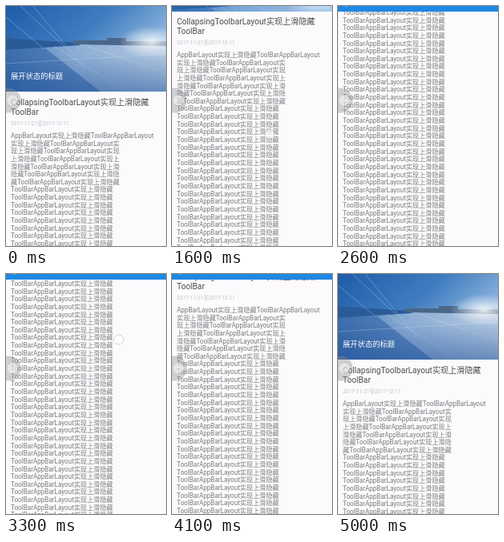
An HTML page for the animation above (5100 ms loop, 200 by 300 pixels).

```html
<!DOCTYPE html>
<html lang="zh">
<head>
<meta charset="utf-8">
<style>
html, body { margin: 0; width: 100%; height: 100%; overflow: hidden; background: #fcfafd; }
svg { display: block; width: 200px; height: 300px; }
text { font-family: Roboto, "Noto Sans CJK SC", "Noto Sans CJK", sans-serif; }
.head { font-size: 10.15px; fill: #4c4c4e; }
.date { font-size: 6.55px; fill: #c3c1c5; }
.body { font-size: 8.13px; fill: #7b7a7d; }
.name { font-size: 9.3px; fill: #fff; }
</style>
</head>
<body>
<svg viewBox="0 0 200 300">
  <defs>
    <linearGradient id="sky" x1="0" y1="0" x2="1" y2=".6">
      <stop offset="0" stop-color="#1f5ca8"/>
      <stop offset=".5" stop-color="#3f7cc0"/>
      <stop offset="1" stop-color="#a5c6e5"/>
    </linearGradient>
    <linearGradient id="ground" x1="0" y1="0" x2="1" y2="0">
      <stop offset="0" stop-color="#4d7bb8"/>
      <stop offset=".45" stop-color="#8eaed5"/>
      <stop offset="1" stop-color="#b3c8e1"/>
    </linearGradient>
    <linearGradient id="shade" x1="0" y1="0" x2="0" y2="1">
      <stop offset="0" stop-color="#1d4f95" stop-opacity="0"/>
      <stop offset="1" stop-color="#1d4f95" stop-opacity=".5"/>
    </linearGradient>
    <radialGradient id="glow">
      <stop offset="0" stop-color="#fff" stop-opacity=".85"/>
      <stop offset="1" stop-color="#fff" stop-opacity="0"/>
    </radialGradient>
    <clipPath id="clip"><rect id="view" width="200" height="107"/></clipPath>
  </defs>
  <rect width="200" height="300" fill="#fcfafd"/>
  <g id="page"></g>
  <g clip-path="url(#clip)">
    <g id="photo">
      <rect width="200" height="107" fill="url(#sky)"/>
      <path d="M0 52L90 47L200 49V107H0Z" fill="url(#ground)"/>
      <path d="M0 40L40 43L92 46V49L0 55Z" fill="#2b5a98"/>
      <path d="M84 43H126V40H150V44H200V50L84 48Z" fill="#4a6689"/>
      <ellipse cx="182" cy="45" rx="42" ry="20" fill="url(#glow)"/>
      <path d="M0 55L48 52L118 107H0Z" fill="#2e61a6" opacity=".55"/>
      <path d="M18 0L74 52M34 0L98 78M0 14L48 54M0 72L200 60M96 48L200 84M60 50L150 107"
        fill="none" stroke="#d4e5f5" stroke-width=".7" opacity=".45"/>
      <rect y="60" width="200" height="47" fill="url(#shade)"/>
    </g>
    <rect id="scrim" width="200" height="107" fill="#1e88e5"/>
    <path id="arrow" d="M9 0H12" stroke="#fff" stroke-width="1" opacity=".7"/>
    <text id="name" class="name" x="6" y="90.5">展开状态的标题</text>
  </g>
  <circle id="touch" r="6" fill="#fff" fill-opacity=".6" stroke="#c9c7cb" stroke-width=".8"/>
  <circle cx="3" cy="118" r="15.5" fill="#8c8c8e" fill-opacity=".4"/>
  <circle cx="8" cy="118" r="6.5" fill="#fff" fill-opacity=".5"/>
</svg>
<script>
const LOOP = 5100, STEP = 100, BAR = 7, FULL = 107, PITCH = 9.65;
const $ = id => document.getElementById(id);
const clamp = v => Math.max(0, Math.min(1, v));

function addText(cls, y, str) {
  const el = document.createElementNS("http://www.w3.org/2000/svg", "text");
  el.setAttribute("class", cls);
  el.setAttribute("x", 6);
  el.setAttribute("y", y);
  el.textContent = str;
  $("page").append(el);
}

const cjk = "实现上滑隐藏", word = "ToolBarAppBarLayout";
addText("head", 123.7, "CollapsingToolbarLayout" + cjk);
addText("head", 135.8, "ToolBar");
addText("date", 148.6, "2017-11-21至2017-12-11");
for (let i = 0; i < 42; i++) {
  const line = i === 0 ? "AppBarLayout" + cjk + word
    : i < 7 ? cjk.slice(i - 1) + word + cjk.slice(0, i)
    : word + cjk;
  addText("body", 164.9 + i * PITCH, line);
}

// Keys are [time, values...]
function along(keys, t) {
  if (t <= keys[0][0]) return keys[0].slice(1);
  for (let i = 1; i < keys.length; i++) {
    const a = keys[i - 1], b = keys[i];
    if (t <= b[0]) {
      const k = (t - a[0]) / (b[0] - a[0]);
      return a.slice(1).map((v, j) => v + (b[j + 1] - v) * k);
    }
  }
  return keys[keys.length - 1].slice(1);
}

const scroll = [[500, 0], [700, 3], [1000, 18], [1600, 101], [2300, 221], [2600, 240.8],
  [3000, 247], [3300, 236.8], [3500, 212], [4100, 117], [4700, 0]];
const drags = [
  [[600, 108, 268], [1000, 110, 250], [1600, 122, 160], [2300, 127, 42]],
  [[3100, 140, 74], [3300, 141, 82], [3500, 147, 106], [4000, 148, 186]],
  [[4200, 146, 152], [4700, 149, 252]]
];

function draw(t) {
  const [s] = along(scroll, t);
  $("page").setAttribute("transform", `translate(0 ${-s})`);
  $("view").setAttribute("height", Math.max(BAR, FULL - s));
  $("photo").setAttribute("transform", `translate(0 ${-Math.min(s, FULL - BAR) / 2})`);
  const scrim = clamp((t - 1500) / 600) - clamp((t - 4250) / 600);
  $("scrim").setAttribute("opacity", scrim);
  $("arrow").setAttribute("opacity", scrim * 0.7);
  $("name").setAttribute("opacity", s < 0.5 ? 1 : 0);

  const drag = drags.find(d => t >= d[0][0] && t <= d[d.length - 1][0]);
  $("touch").setAttribute("opacity", drag ? 1 : 0);
  if (drag) {
    const [x, y] = along(drag, t);
    $("touch").setAttribute("cx", x);
    $("touch").setAttribute("cy", y);
  }
}

const start = performance.now();
function tick() {
  const t = (performance.now() - start) % LOOP;
  draw(Math.floor(t / STEP) * STEP);
  requestAnimationFrame(tick);
}
tick();
</script>
</body>
</html>
```
